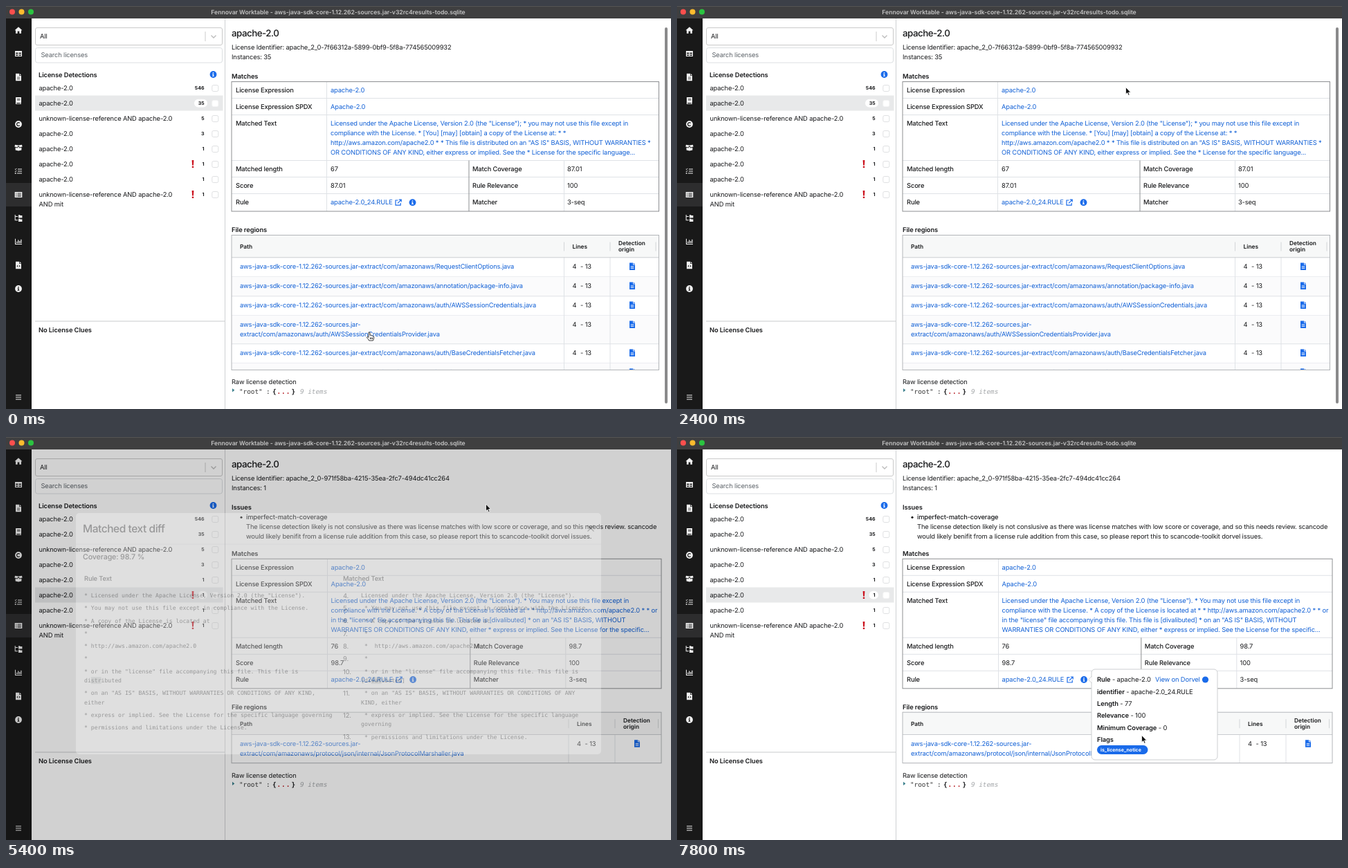
Recreate the animation shown at these times as an HTML page. Size 961 by 583 pixels, loop 8 s.

```html
<!DOCTYPE html>
<html lang="en">
<head>
<meta charset="utf-8">
<title>License browser</title>
<style>
html,body{margin:0;width:100%;height:100%;overflow:hidden;background:#fff}
svg{display:block;width:100vw;height:100vh}
text{font:9.33px Inter,sans-serif;letter-spacing:-.14px;white-space:pre;fill:#18191b;text-rendering:geometricPrecision}
.m{font-weight:500}
.b{font-weight:600;letter-spacing:-.08px}
.h{font-size:13.33px;font-weight:500;letter-spacing:-.5px}
.t{font-size:15.5px;font-weight:500;letter-spacing:-.45px}
.c{font-size:10.67px;font-weight:500;letter-spacing:-.12px}
.g{font-size:8.33px;font-weight:600;letter-spacing:0}
.n{font-size:7px;font-weight:700;letter-spacing:0;text-anchor:end}
.badge{font-size:7px;font-weight:700;letter-spacing:0;fill:#fff}
.bar{font-size:8.67px;font-weight:600;letter-spacing:-.05px;text-anchor:middle;fill:#c4c4c4}
.l{fill:#1160d6}
.hover .l{fill:#0a4aa8}
.q{fill:#5c6268}
.mono{font:8.167px "DejaVu Sans Mono",monospace;letter-spacing:0}
.j{font:9.33px "DejaVu Sans Mono",monospace;letter-spacing:0}
</style>
</head>
<body>
<svg id="stage" viewBox="0 0 961 583"></svg>
<script>
const INK = '#18191b', LINE = '#dfe2e6', EDGE = '#8d8f92', BLUE = '#1a6bea', SIDE = '#191919';
const JAR = 'aws-java-sdk-core-1.12.262-sources.jar-';

// y is the vertical middle of the text line
const text = (x, y, s, cls = '') => `<text x="${x}" y="${y + 3.3}" class="${cls}">${s}</text>`;
const rect = (x, y, w, h, fill, stroke = 'none', r = 0) =>
  `<rect x="${x}" y="${y}" width="${w}" height="${h}" rx="${r}" fill="${fill}" stroke="${stroke}"/>`;
const path = (d, fill, stroke = 'none', w = 1) =>
  `<path d="${d}" fill="${fill}" fill-rule="evenodd" stroke="${stroke}" stroke-width="${w}"/>`;
const hline = (x1, x2, y, c = LINE) => path(`M${x1} ${y}H${x2}`, 'none', c);
const vline = (x, y1, y2, c = LINE) => path(`M${x} ${y1}V${y2}`, 'none', c);
const at = (x, y, s) => `<g transform="translate(${x} ${y})">${s}</g>`;
const group = (id, s) => `<g id="${id}">${s}</g>`;
const info = (x, y, fill = BLUE, dot = '#fff') =>
  at(x, y, `<circle r="4.9" fill="${fill}"/>` + path('M-.8-3H.7V-1.6H-.8ZM-1.4-.8H.7V1.9H1.4V2.8H-1.5V1.9H-.8V0H-1.4Z', dot));

const FILE = 'M-4-5.3H1V-2.2H4V5.3H-4ZM1.8-5.3L4-3H1.8Z';
const fileIcon = (x, y) => at(x, y, path(FILE + 'M-2.3-.2H2.3V.7H-2.3ZM-2.3 2H2.3V2.9H-2.3Z', BLUE));

function sidebar() {
  const icons = [
    'M-5.5.3L0-4.8 5.5.3H4V4.7H1.3V1.5H-1.3V4.7H-4V.3Z',
    'M-5-4H5V4H-5ZM-3.8-1.4V.2H-.6V-1.4ZM.6-1.4V.2H3.8V-1.4ZM-3.8 1.4V2.9H-.6V1.4ZM.6 1.4V2.9H3.8V1.4Z',
    FILE + 'M-2-.2H2V.6H-2ZM-2 2H2V2.8H-2Z',
    'M-4-5H4V3H3.4V4.2H4V5H-4ZM-2-3H2.5V-2.2H-2ZM-2-1.2H2.5V-.4H-2ZM-2.8 3V4.2H2.4V3Z',
    '',
    'M-5-4.2L0-3.4 5-4.2 5.6-1.6 2-.6 0-3-2-.6-5.6-1.6ZM-4.4-.2L-1.8.5 0-1.6 1.8.5 4.4-.2V3.4L0 4.6-4.4 3.4Z',
    'M-1-3.6H5V-2.4H-1ZM-1-.6H5V.6H-1ZM-2 2.4H5V3.6H-2ZM-5.2 2.2H-3.4V3.8H-5.2Z',
    'M-5.3-4H5.3V4H-5.3ZM-3.8-2.5V-1.4H-2.6V-2.5ZM-1.5-2.5V-1.4H3.8V-2.5ZM-3.8-.5V.6H-2.6V-.5ZM-1.5-.5V.6H3.8V-.5ZM-3.8 1.6V2.7H-2.6V1.6ZM-1.5 1.6V2.7H3.8V1.6Z',
    'M-5.3-5H-4.3V-3H-1V-2H-4.3V2.3H-1V3.3H-5.3ZM0-4.7H2L2.7-4H5.4V-.4H0ZM0 .8H2L2.7 1.5H5.4V5H0Z',
    'M-5-4.2H-4V3H5V4H-5ZM-2.8-.2H-1.6V2H-2.8ZM-.7-2.4H.5V2H-.7ZM1.3-1H2.5V2H1.3ZM3.3-3.2H4.5V2H3.3Z',
    FILE + 'M-.8-.6L-2.6 1.2-.8 3V1.8L-1.4 1.2-.8.6ZM.8-.6L2.6 1.2.8 3V1.8L1.4 1.2.8.6Z'
  ];
  let s = rect(0, 18, 37, 565, SIDE) + rect(0, 256, 37, 34, '#2d2d2e');
  icons.forEach((d, i) => s += at(18, 35 + 34 * i, path(d, '#f2f2f2')));
  s += at(18, 171, '<circle r="4.9" fill="#f2f2f2"/>' + path('M1.8-1.6A2.4 2.4 0 1 0 1.8 1.6', 'none', SIDE, 1.2));
  s += at(18, 239, path('M-5.2-3.2l.9.9 1.5-1.8M-5.2-.1l.9.9 1.5-1.8', 'none', '#f2f2f2'));
  s += info(18, 409, '#f2f2f2', SIDE);
  return s + at(18, 566, path('M-4-3.6H4V-2.4H-4ZM-4-.6H4V.6H-4ZM-4 2.4H4V3.6H-4Z', '#f2f2f2'));
}

function titleBar() {
  const lights = ['#fc4f4d', '#fdbb2e', '#2bc440'].map((c, i) => `<circle cx="${9 + 13.5 * i}" cy="8.5" r="4" fill="${c}"/>`);
  return rect(0, 0, 961, 18, '#3f3f40') + hline(0, 961, .5, '#555') + lights.join('') +
    text(480, 8.2, `Fennovar Worktable - ${JAR}v32rc4results-todo.sqlite`, 'bar');
}

function listPanel(selected) {
  const both = 'unknown-license-reference AND apache-2.0';
  const counts = [546, 35, 5, 3, 1, 1, 1, 1];
  let s = rect(42.5, 31.5, 270, 25, '#fff', '#c9c9c9', 2.5) + text(49, 44, 'All') + vline(288, 37, 51, '#ccc') +
    path('M296.5 42.5l3.5 3.5 3.5-3.5', 'none', '#bbb', 1.3) +
    rect(42.5, 60.5, 270, 21.5, '#fff', '#dcdfe2', 3) + text(50.5, 71, 'Search licenses', 'q') +
    text(47, 99.7, 'License Detections', 'b') + info(299.5, 99);
  counts.forEach((n, i) => {
    const y = 118.5 + 22 * i, on = i === selected;
    if (on) s += rect(42, y - 11, 271.5, 22, '#e8e9ea');
    s += text(47.5, y, i === 2 || i === 7 ? both : 'apache-2.0');
    if (on) s += rect(on && n > 9 ? 272 : 277.5, y - 5.7, n > 9 ? 19 : 13.5, 11.8, '#fff', 'none', 5.9);
    s += text(286.5, y - .7, n, 'n') + rect(297.8, y - 4, 9, 9, '#fff', on ? '#f4f4f4' : '#dfe0e2', 2);
    if (i === 5 || i === 7) s += at(270, y, path('M-1.4-5.6H1.4L.9 2H-.9ZM-1.2 3.2H1.2V5.4H-1.2Z', '#cc1420'));
  });
  return s + text(47.5, 286.5, 'AND mit') + hline(42, 316, 456, '#c9cbcd') +
    text(47, 468.7, 'No License Clues', 'b') + vline(316.5, 18, 583, '#cfd1d3');
}

// Match details; o holds the data, k shifts the columns, top is the table's upper edge
function matchTable(o) {
  const { top, right, k } = o, mid = 669 + k * 1.8, v = 469 + k * .6;
  const key = (x, row, s) => text(x, top + row, s, 'm');
  let s = text(326, top - 8, 'Matches', 'b');
  [24, 48, 114, 138, 162].forEach(y => s += hline(326, right, top + y));
  s += vline(463.5 + k, top, top + 187.5) + vline(806.5 + k * 2.3, top + 114, top + 187.5) +
    vline(mid, top + 114, top + 187.5, EDGE) + rect(326, top, right - 326, 187.5, 'none', EDGE);
  s += key(332, 12.3, 'License Expression') + text(v, top + 12.3, 'apache-2.0', 'l') +
    key(332, 36.3, 'License Expression SPDX') + text(v, top + 36.3, 'Apache-2.0', 'l') + key(332, 60.3, 'Matched Text');
  s += `<g id="${o.id}Link">` + o.matched.map((m, i) => text(v, top + 60.3 + 14 * i, m, 'l')).join('') + '</g>';
  const x2 = mid + 5, x3 = 811 + k * 2.6;
  s += key(332, 126.3, 'Matched length') + text(v, top + 126.3, o.length) + key(x2, 126.3, 'Match Coverage') + text(x3, top + 126.3, o.cover) +
    key(332, 150.3, 'Score') + text(v, top + 150.3, o.cover) + key(x2, 150.3, 'Rule Relevance') + text(x3, top + 150.3, '100') +
    key(332, 174.5, 'Rule') + text(v, top + 174.5, 'apache-2.0_24.RULE', 'l') + key(x2, 174.5, 'Matcher') + text(x3, top + 174.5, '3-seq');
  s += at(567 + k, top + 174.7, path('M-.5-3.2H-4V4H3.2V.8M.8-4H4.2V-.6M4-3.8L-1 1.2', 'none', BLUE, 1.2));
  return s + info(587.5 + k * .6, top + 174.7);
}

function regions(o) {
  const { right, cols: [c1, c2] } = o, top = o.regionTop, h = o.regionHeight;
  let y = top + 32.3;
  let s = rect(326, top, right - 326, 32, '#f7f8f8');
  o.paths.forEach((p, i) => {
    const rh = p.length > 1 ? 41 : 28;
    if (i % 2) s += rect(326, y, right - 326, rh, '#fbfbfc');
    p.forEach((line, j) => s += text(338, y + 13 + 14 * j, line, 'l'));
    s += text(c1 + 12, y + 13, '4') + text(c1 + 23.5, y + 13, '- 13') + fileIcon(c2 + 32, y + 13) + hline(326, right, y + rh);
    y += rh;
  });
  s += vline(c1, top + 32, top + h) + vline(c2, top + 32, top + h) + hline(326, right, top + 32.3, '#c9cccf');
  [c1, c2, right - 4.5].forEach(x => s += vline(x, top + 10, top + 23, '#d3d6d8'));
  s += text(338, top + 16, 'Path', 'g') + text(c1 + 12, top + 16, 'Lines', 'g') +
    text(c2 + 12, top + 11.4, 'Detection', 'g') + text(c2 + 12, top + 20.6, 'origin', 'g');
  return text(326, top - 7.7, 'File regions', 'b') +
    `<clipPath id="${o.id}Clip"><rect x="326" y="${top}" width="${right - 326}" height="${h}"/></clipPath>` +
    `<g clip-path="url(#${o.id}Clip)">${s}</g>` + rect(326, top, right - 326, h, 'none', '#b3b6b9');
}

function rawView(y) {
  const j = (x, s, style) => `<text x="${x}" y="${y + 17}" class="j" style="${style}">${s}</text>`;
  return text(326, y, 'Raw license detection') + path(`M327 ${y + 9.5}l3.3 2.6-3.3 2.6Z`, '#3a7f8c') + j(337, '"root"', 'fill:#333') + j(376, ':', '') +
    j(385, '{', 'font-weight:700') + j(391.5, '...', 'font-weight:700;fill:#b3141c;letter-spacing:1px') +
    j(412.5, '}', 'font-weight:700') + j(425, '9 items', 'font-style:italic;fill:#a3a6a9');
}

function page(o) {
  let s = rect(0, 18, 961, 565, '#fff') + sidebar() + listPanel(o.row) + text(326, 41, 'apache-2.0', 'h') +
    text(326, 59.8, 'License Identifier: ' + o.ident) + text(326, 74, 'Instances: ' + o.instances);
  if (o.issue) s += text(326, 101.7, 'Issues', 'b') + '<circle cx="340" cy="116.3" r="1.5"/>' + text(347, 116, 'imperfect-match-coverage', 'm') +
    o.issue.map((line, i) => text(347, 130 + 14 * i, line)).join('');
  else s += rect(952, 31, 4, 544, '#8a8a8b', 'none', 2);
  return group(o.id, s + matchTable(o) + regions(o) + rawView(o.rawY));
}

// ~marked~ parts of a line get a tinted background
function codeLine(x, y, s, tint) {
  const cw = 8.167 * .602;
  let out = '', col = 0;
  s.split('~').forEach((part, i) => {
    if (i % 2) out += rect(x + col * cw, y - 5, part.length * cw, 10, tint);
    col += part.length;
  });
  return out + `<text class="mono" x="${x}" y="${y + 2.9}">${s.replaceAll('~', '')}</text>`;
}

// A line break inside an entry is a soft wrap
function codeColumn(x, lines, tint, first) {
  let y = 245, out = '';
  lines.forEach((entry, i) => {
    if (first) out += text(487, y + .4, first + i + '.');
    entry.split('\n').forEach((s, j) => {
      if (j) y += 13.3;
      out += codeLine(x, y, s, tint);
    });
    y += 18.3;
  });
  return out;
}

function modal(id, bottom, cover, left, right, tintL, tintR) {
  return group(id, rect(101, 126, 759, bottom - 126, '#fff', 'none', 5) + hline(101, 860, 171, '#e7eaec') +
    text(111, 150.8, 'Matched text diff', 't') + path('M840.5 143.5l9 9m0-9l-9 9', 'none', '#555', 1.1) +
    text(111, 189.3, `Coverage: ${cover} %`, 'c') + text(113, 220.7, 'Rule Text', 'm') + text(487, 220.7, 'Matched Text', 'm') +
    codeColumn(113, left, tintL) + codeColumn(513, right, tintR, 4));
}

function popover() {
  const rows = [['Rule', 'apache-2.0'], ['identifier', 'apache-2.0_24.RULE'], ['Length', '77'], ['Relevance', '100'], ['Minimum Coverage', '0'], ['Flags']];
  let s = rect(599, 336, 182, 131, '#fff', '#cdcfd1', 5) + path('M599.5 346l-5 5 5 5', '#fff', '#cdcfd1');
  rows.forEach(([k, v], i) => s += text(607, 351 + 17.35 * i, `<tspan class="b">${k}</tspan>` + (v ? ' - ' + v : '')));
  return group('pop', s + text(691, 351, 'View on Dorvel', 'l') + `<circle cx="763.5" cy="351" r="4.6" fill="${BLUE}"/>` +
    rect(607, 446, 73.5, 13, BLUE, 'none', 6.5) + text(612, 451.7, 'is_license_notice', 'badge'));
}

const cursors =
  group('arrow', path('M0 0V10.2L2.3 8.1 3.9 11.8 5.6 11 4 7.5H7.2Z', '#111', '#fff', .8)) +
  group('ibeam', path('M-2.3-5.3Q0-5.3 0-3.8 0-5.3 2.3-5.3M0-4V4M-2.3 5.3Q0 5.3 0 3.8 0 5.3 2.3 5.3M-1.2.8H1.2', 'none', '#222', 1)) +
  group('hand', path('M-1 1Q-1-.4 0-.4T1 1V4.3Q3 3.6 3.3 5 5 4.6 5.2 5.8 6.8 5.6 6.7 7.4 6.7 9.5 5.4 12H-.4Q-1.3 9.6-3.8 7.5-3.5 5.6-1 7.4ZM1.4 7.5V10M3 7.5V10M4.6 7.5V10', '#fff', '#222', .9));

const head = '* Licensed under the Apache License, Version 2.0 (the "License").';
const use = '* You may not use this file except in compliance with the License.';
const url = 'http://aws.amazon.com/apache2.0';
const tail = ['* on an "AS IS" BASIS, WITHOUT WARRANTIES OR CONDITIONS OF ANY KIND,\neither',
  '* express or implied. See the License for the specific language governing', '* permissions and limitations under the License.'];

const first = {
  id: 'p1', row: 1, ident: 'apache_2_0-7f66312a-5899-0bf9-5f8a-774565009932', instances: 35,
  top: 109.5, right: 943.5, k: 0, length: 67, cover: '87.01',
  matched: ['Licensed under the Apache License, Version 2.0 (the "License"); * you may not use this file except in',
    'compliance with the License. * [You] [may] [obtain] a copy of the License at: * *',
    url + ' * * This file is distributed on an "AS IS" BASIS, WITHOUT WARRANTIES *',
    'OR CONDITIONS OF ANY KIND, either express or implied. See the * License for the specific language...'],
  regionTop: 331.5, regionHeight: 195, cols: [806.5, 873], rawY: 543.7,
  paths: [['RequestClientOptions'], ['annotation/package-info'], ['auth/AWSSessionCredentials'], ['auth/AWSSessionCredentialsProvider', 1],
    ['auth/BaseCredentialsFetcher'], ['auth/InstanceProfileCredentials']].map(([f, wrap]) =>
    wrap ? [JAR, `extract/com/amazonaws/${f}.java`] : [`${JAR}extract/com/amazonaws/${f}.java`])
};
const second = {
  id: 'p2', row: 5, ident: 'apache_2_0-971f58ba-4215-35ea-2fc7-494dc41cc264', instances: 1,
  issue: ['The license detection likely is not conslusive as there was license matches with low score or coverage, and so this needs review. scancode',
    'would likely benifit from a license rule addition from this case, so please report this to scancode-toolkit dorvel issues.'],
  top: 176.3, right: 947, k: 1, length: 76, cover: '98.7',
  matched: ['Licensed under the Apache License, Version 2.0 (the "License"). * You may not use this file except in',
    `compliance with the License. * A copy of the License is located at * * ${url} * * or`,
    'in the "license" file accompanying this file. This file is [divalibuted] * on an "AS IS" BASIS, WITHOUT',
    'WARRANTIES OR CONDITIONS OF ANY KIND, either * express or implied. See the License for the specific...'],
  regionTop: 398.2, regionHeight: 73.5, cols: [813, 880], rawY: 489.3,
  paths: [[JAR, 'extract/com/amazonaws/protocol/json/internal/JsonProtocolMarshaller.java']]
};

const stage = document.getElementById('stage');
stage.innerHTML = page(first) + page(second) + popover() +
  `<rect id="shade" y="18" width="961" height="565" fill="#000"/>` +
  modal('m1', 462, '87.01',
    [head, use, '* ~A~ copy of the License ~is located at~', '*', '* ' + url, '*',
      '~* or~ ~in the "license" file accompanying this file.~ This file is\ndistributed', ...tail],
    ['Licensed under the Apache License, Version 2.0 (the "License");', ' * you may not use this file except in compliance with the License.',
      ' * ~[You] [may] [obtain] a~ copy of the License at:', ' *', ' *    ' + url, ' *',
      ' * This file is distributed on an "AS IS" BASIS, WITHOUT WARRANTIES', ' * OR CONDITIONS OF ANY KIND, either express or implied. See the',
      ' * License for the specific language governing permissions and', ' * limitations under the License.'], '#dec5c8', '#d0e2e1') +
  modal('m2', 475, '98.7',
    [head, use, '* A copy of the License is located at', '*', '* ' + url, '*',
      '* or in the "license" file accompanying this file. This file is\ndi~str~ibuted', ...tail],
    [head.slice(2), ' ' + use, ' * A copy of the License is located at', ' *', ' *  ' + url, ' *',
      ' * or in the "license" file accompanying this file. This file is\n[di~val~ibuted]',
      ' * on an "AS IS" BASIS, WITHOUT WARRANTIES OR CONDITIONS OF ANY\nKIND, either',
      ' * express or implied. See the License for the specific language\ngoverning', ' ' + tail[2]], '#cfd4d4', '#cfd4d4') +
  titleBar() + cursors;

const el = id => document.getElementById(id);
const show = (id, on) => el(id).setAttribute('display', on ? 'inline' : 'none');

// time, x, y, pointer shape from then on
const track = [
  [0, 525, 472, 'hand'], [200, 525, 472, 'hand'], [800, 558, 212, 'hand'], [1000, 557.5, 212, 'arrow'], [1400, 557.5, 212, 'arrow'],
  [2000, 649, 117.5, 'arrow'], [2400, 648.5, 117.5, 'arrow'], [3000, 130, 225, 'hand'], [3200, 130, 225, 'hand'], [3800, 527, 236, 'hand'],
  [4200, 527, 232, 'ibeam'], [4600, 527, 232, 'ibeam'], [5200, 693.5, 97, 'arrow'], [5400, 693.5, 97, 'arrow'], [5600, 708, 137, 'ibeam'],
  [6000, 640, 262, 'hand'], [6200, 595, 352, 'hand'], [7000, 595, 352, 'arrow'], [7600, 671.5, 431.5, 'arrow'], [8000, 671.5, 431.5, 'arrow']
];

function pointer(t) {
  const i = track.findIndex((k, n) => n && t < k[0]);
  const [t0, x0, y0, kind] = track[i - 1], [t1, x1, y1] = track[i], f = (t - t0) / (t1 - t0);
  for (const id of ['arrow', 'ibeam', 'hand']) show(id, id === kind);
  el(kind).setAttribute('transform', `translate(${x0 + (x1 - x0) * f} ${y0 + (y1 - y0) * f})`);
}

// [modal opacity, backdrop opacity, vertical offset]
function dialog(t, open, close) {
  if (t < open || t > close) return [0, 0, 0];
  if (t === open) return [.82, .36, -8];
  return t === close ? [.3, .18, -16] : [1, .5, 0];
}

function draw(now) {
  const t = Math.floor(now % 8000 / 200) * 200;
  show('p1', t < 3200);
  show('p2', t >= 3200);
  show('pop', t >= 7000);
  const states = { m1: dialog(t, 1000, 2200), m2: dialog(t, 4200, 5400) };
  for (const [id, [opacity, , dy]] of Object.entries(states)) {
    show(id, opacity);
    el(id).setAttribute('opacity', opacity);
    el(id).setAttribute('transform', `translate(0 ${dy})`);
  }
  el('shade').setAttribute('opacity', states.m1[1] + states.m2[1]);
  el('p1Link').setAttribute('class', t === 800 ? 'hover' : '');
  el('p2Link').setAttribute('class', t === 3800 || t === 4000 || t === 6000 ? 'hover' : '');
  pointer(t);
}

const start = performance.now();
function tick() {
  draw(performance.now() - start);
  requestAnimationFrame(tick);
}
tick();
</script>
</body>
</html>
```
